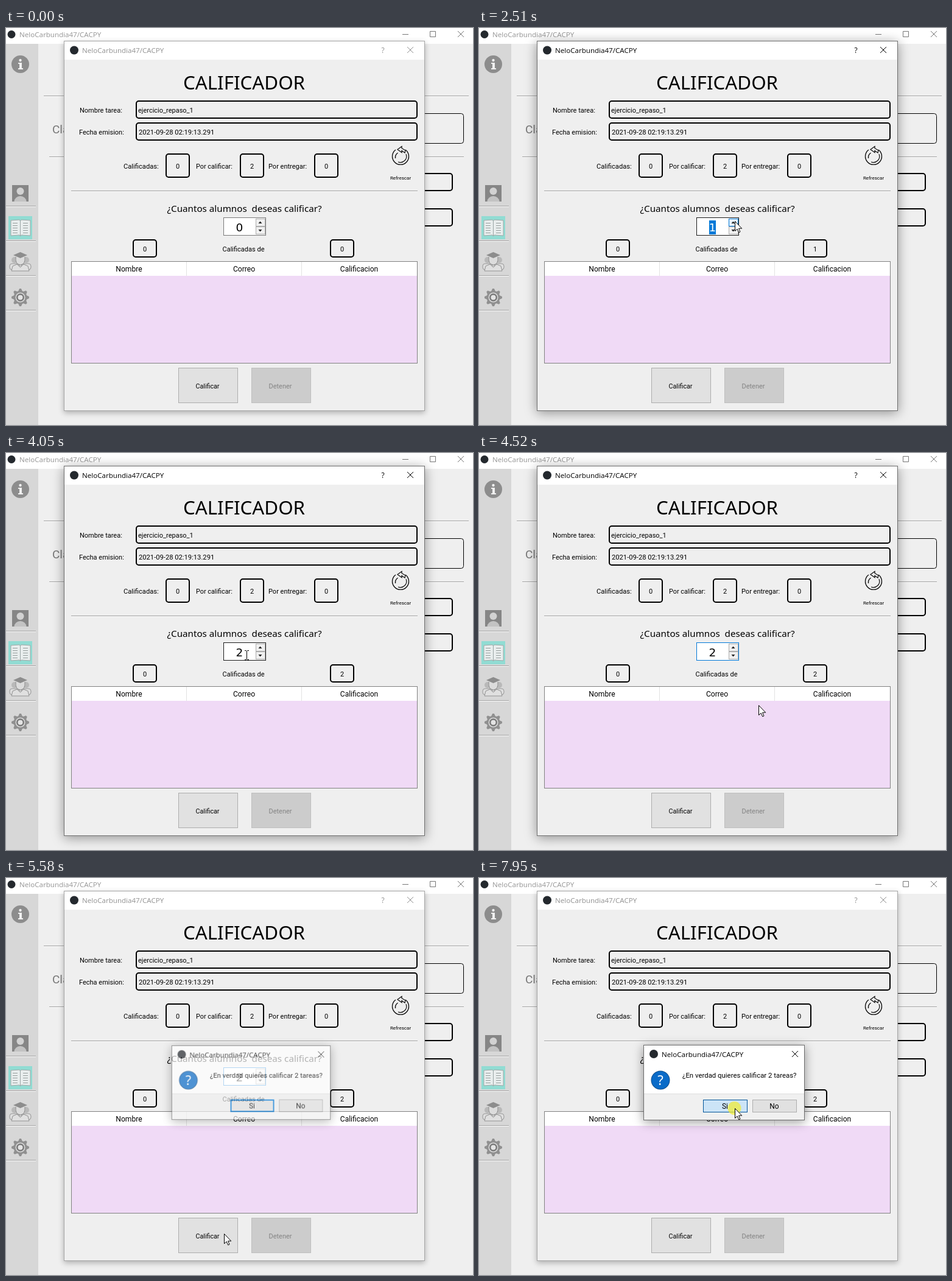
Write an HTML page with a canvas that moves like this. It is 767 px wide and 652 px high and loops after 8000 ms.

```html
<!DOCTYPE html>
<html lang="es">
<head>
<meta charset="utf-8">
<title>Calificador</title>
<style>
html, body { margin: 0; width: 767px; height: 652px; overflow: hidden; background: #efefef; }
canvas { display: block; }
</style>
</head>
<body>
<canvas id="stage" width="767" height="652"></canvas>
<script>
const ctx = document.getElementById('stage').getContext('2d');
const LOOP = 8000;
const TITLE = 'NeloCarbundia47/CACPY';
const UI = 'Roboto, sans-serif', BAR = '"Open Sans", sans-serif';
const BIG = '"Noto Sans", sans-serif', DIGIT = '"DejaVu Sans", sans-serif';
const BLUE = '#0078d7', FACE = '#efefef';

// Pointer stops: time, x, y
const PATH = [
  [590, 700, 614], [730, 577, 480], [1140, 577, 480], [1500, 432, 270], [1700, 424, 296],
  [1900, 420, 317], [3310, 420, 317], [3520, 418, 365], [3740, 395, 331], [4320, 395, 331],
  [4560, 472, 430], [4850, 372, 500], [5110, 358, 584], [6060, 358, 584], [6470, 410, 403],
  [6810, 418, 382], [6880, 418, 382], [7150, 420, 378]
];
const CLICKS = [2230, 2790, 3750, 5250, 7880];

const ramp = (t, a, b) => Math.min(1, Math.max(0, (t - a) / (b - a)));
const gray = v => `rgb(${v},${v},${v})`;
const inside = (p, x, y, w, h) => p && p.x >= x && p.x < x + w && p.y >= y && p.y < y + h;

function pointerAt(t) {
  if (t < PATH[0][0]) return null;
  const i = PATH.findIndex(k => k[0] > t);
  if (i < 0) { const [, x, y] = PATH[PATH.length - 1]; return { x, y }; }
  const a = PATH[i - 1], b = PATH[i], p = ramp(t, a[0], b[0]);
  return { x: a[1] + (b[1] - a[1]) * p, y: a[2] + (b[2] - a[2]) * p };
}

function rect(x, y, w, h, color) {
  ctx.fillStyle = color;
  ctx.fillRect(x, y, w, h);
}
function framed(x, y, w, h, fill, border, line = 1) {
  rect(x, y, w, h, border);
  rect(x + line, y + line, w - 2 * line, h - 2 * line, fill);
}
function rounded(x, y, w, h, line = 2) {
  ctx.beginPath();
  ctx.roundRect(x + line / 2, y + line / 2, w - line, h - line, 4);
  ctx.strokeStyle = '#000';
  ctx.lineWidth = line;
  ctx.stroke();
}
function disc(x, y, r, color) {
  ctx.beginPath();
  ctx.arc(x, y, r, 0, 2 * Math.PI);
  ctx.fillStyle = color;
  ctx.fill();
}
function shape(points, fill, stroke, line = 1) {
  ctx.beginPath();
  points.forEach(([x, y]) => ctx.lineTo(x, y));
  ctx.closePath();
  if (fill) { ctx.fillStyle = fill; ctx.fill(); }
  if (stroke) { ctx.strokeStyle = stroke; ctx.lineWidth = line; ctx.stroke(); }
}
function stroke(d, color, line = 1) {
  ctx.strokeStyle = color;
  ctx.lineWidth = line;
  ctx.stroke(new Path2D(d));
}
function text(s, x, y, size = 11, family = UI, color = '#000', align = 'left') {
  ctx.font = `${size}px ${family}`;
  ctx.textAlign = align;
  ctx.fillStyle = color;
  ctx.fillText(s, x, y);
}
const centered = (s, x, y, size, family, color) => text(s, x, y, size, family, color, 'center');
function groove(x, y, w) {
  rect(x, y, w, 1, '#a0a0a0');
  rect(x, y + 1, w, 1, '#fff');
}
function closeMark(x, y, color) {
  stroke(`M${x} ${y}l10 10m0-10l-10 10`, color);
}
function counter(value, x, y, h) {
  rounded(x, y, 40, h);
  centered(value, x + 20, y + h / 2 + 5);
}
function shadowed(x, y, w, h, alpha, blur) {
  ctx.save();
  ctx.shadowColor = `rgba(0,0,0,${alpha})`;
  ctx.shadowBlur = blur;
  ctx.shadowOffsetY = 3;
  rect(x, y, w, h, '#fff');
  ctx.restore();
}

function sidebar() {
  rect(0, 26, 53, 626, '#d7d7d7');
  disc(23.5, 59.5, 14.5, '#8d8d8d');
  disc(23.5, 53, 2.2, '#f0f0f0');
  rect(22, 57, 4, 11, '#f0f0f0');
  rect(20, 57, 3, 2, '#f0f0f0');
  rect(20, 66, 8, 2, '#f0f0f0');
  [292, 349, 406, 463].forEach(y => groove(0, y, 49));

  rect(10, 258, 27, 27, '#868686');
  ctx.save();
  ctx.beginPath();
  ctx.rect(10, 258, 27, 27);
  ctx.clip();
  ctx.beginPath();
  ctx.ellipse(23.5, 285, 10, 9, 0, 0, 2 * Math.PI);
  ctx.fillStyle = '#c3c3c3';
  ctx.fill();
  disc(23.5, 268, 6, '#d2d2d2');
  ctx.restore();

  rect(4, 309, 39, 38, '#91dcd3');
  shape([[8, 316], [22, 315], [23.5, 317], [25, 315], [40, 316], [40, 341], [25, 340], [23.5, 342], [22, 340], [8, 341]], '#e9eeee', '#a0a8a7');
  stroke('M23.5 317v24', '#9aa5a4');
  for (let y = 320.5; y < 338; y += 4) stroke(`M11 ${y}h8m9 0h8`, '#969e9d');

  for (const x of [14, 33]) {
    disc(x, 381, 5, '#b9b9b9');
    ctx.beginPath();
    ctx.roundRect(x - 8, 387, 16, 10, 4);
    ctx.fillStyle = '#dedede';
    ctx.fill();
    ctx.strokeStyle = '#999';
    ctx.stroke();
  }
  disc(23.5, 380, 8, '#dcdcdc');
  stroke('M16 376q-1 13 7.500 13q8.500 0 7.500-13', '#888');
  shape([[12, 373], [23.5, 368], [35, 373], [23.5, 378]], '#8d8d8d');
  shape([[9, 399], [11, 391], [18, 388], [23.5, 393], [29, 388], [36, 391], [38, 399]], '#e0e0e0', '#929292');

  const teeth = [];
  for (let i = 0; i < 32; i++) {
    const a = (i - 0.5) * Math.PI / 16, r = i % 4 < 2 ? 14.5 : 11;
    teeth.push([23.5 + r * Math.cos(a), 442.5 + r * Math.sin(a)]);
  }
  shape(teeth, '#909090');
  disc(23.5, 442.5, 8, '#d9d9d9');
  disc(23.5, 442.5, 6.5, '#777');
  disc(23.5, 442.5, 4, '#e4e4e4');
}

function mainWindow() {
  rect(0, 0, 767, 652, FACE);
  rect(0, 0, 767, 26, '#fff');
  disc(9, 10.500, 6.500, '#24292e');
  text(TITLE, 22, 15, 11.6, BAR, '#959595');
  rect(651, 10, 10, 1, '#777');
  stroke('M696.5 5.5h9v9h-9z', '#777');
  closeMark(742, 5, '#777');
  sidebar();
  groove(62, 111, 698);
  text('Clase', 76, 173, 19, UI, '#777');
  rounded(600, 140, 152, 50, 1);
  groove(71, 211, 681);
  rounded(600, 238, 134, 30);
  rounded(600, 296, 134, 30);
}

function refreshIcon() {
  stroke('M640 200a13.500 13.500 0 1 0 16 0M643.500 205a9.500 9.500 0 0 0-4 9', '#111', 1.4);
  stroke('M657 207a10 10 0 0 1-13 13', '#111', 1.2);
  shape([[643, 199.500], [650, 194.500], [650, 197.500], [656, 201], [655, 205], [650, 201.500], [650, 204.500]], FACE, '#111', 1.3);
  centered('Refrescar', 648, 248.500, 8);
}

function spinner(t, p, count) {
  const hover = inside(p, 357, 311, 70, 30);
  const border = hover ? '#1c1c1c' : t > 2230 ? BLUE : '#7a7a7a';
  framed(357, 311, 70, 30, '#fff', border);
  const selected = count > 0 && t < 3800;
  if (selected) rect(378, 316, 11, 23, BLUE);
  centered(count, 383.500, 334, 18.5, DIGIT, selected ? '#fff' : '#000');
  const up = inside(p, 410, 311, 17, 15), down = inside(p, 410, 326, 17, 15);
  framed(410, 313, 16, 13, up ? '#e5f1fb' : '#f0f0f0', up ? BLUE : '#adadad');
  framed(410, 326, 16, 13, down ? '#e5f1fb' : '#f0f0f0', down ? BLUE : '#adadad');
  shape([[414.5, 321], [417.5, 317.5], [420.5, 321]], '#222');
  shape([[414.5, 331], [417.5, 334.500], [420.5, 331]], '#222');
}

function table() {
  framed(107, 383, 569, 168, '#f0daf6', '#828282');
  rect(108, 384, 567, 23, '#fff');
  rect(296, 384, 1, 23, '#e2e2e2');
  rect(485, 384, 1, 23, '#e2e2e2');
  centered('Nombre', 202, 400, 12.1);
  centered('Correo', 391, 400, 12.1);
  centered('Calificacion', 580, 400, 12);
}

function dialog(t, p) {
  const active = ramp(t, 2230, 2450) * (1 - ramp(t, 5330, 5530));
  const ink = gray(Math.round(145 * (1 - active)));
  const count = t < 2250 ? 0 : t < 2800 ? 1 : 2;

  shadowed(95, 21, 593, 608, 0.28 + 0.12 * active, 9 + 9 * active);
  framed(95, 21, 593, 608, FACE, gray(Math.round(165 - 55 * active)));
  rect(96, 22, 591, 30, '#fff');
  disc(112, 36.500, 7, '#24292e');
  text(TITLE, 125, 41, 11.6, BAR, ink);
  centered('?', 619, 41, 12, BAR, ink);
  closeMark(659, 31, ink);

  centered('CALIFICADOR', 391, 101, 31.3, BIG);
  text('Nombre tarea:', 121, 139);
  text('Fecha emision:', 120, 175);
  rounded(213, 119, 463, 30);
  rounded(213, 155, 463, 30);
  text('ejercicio_repaso_1', 217, 139);
  text('2021-09-28 02:19:13.291', 218, 175, 11.2);
  text('Calificadas:', 193, 231, 11.2);
  text('Por calificar:', 312, 231, 10.8);
  text('Por entregar:', 431, 231);
  counter('0', 262, 206, 40);
  counter('2', 384, 206, 40);
  counter('0', 506, 206, 40);
  refreshIcon();
  groove(107, 267, 569);

  centered('¿Cuantos alumnos  deseas calificar?', 391.5, 302, 15.2, BIG);
  spinner(t, p, count);
  counter('0', 208, 347, 30);
  counter(count, 532, 347, 30);
  centered('Calificadas de', 390, 367);
  table();

  const hover = t < 5480 && inside(p, 283, 558, 98, 58);
  const pressed = hover && t >= 5250 && t < 5400;
  framed(283, 558, 98, 58, pressed ? '#cce4f7' : hover ? '#e5f1fb' : '#e1e1e1', hover ? BLUE : '#adadad');
  centered('Calificar', 331, 592, 10.7);
  framed(403, 558, 98, 58, '#ccc', '#bfbfbf');
  centered('Detener', 450.5, 592, 11, UI, '#838383');
}

function question(t, p) {
  const k = ramp(t, 5500, 5680), open = 1 - (1 - k) ** 2;
  if (!open) return;
  const layer = new OffscreenCanvas(767, 652), page = ctx.canvas;
  const g = layer.getContext('2d');
  // Compose the box apart so that it fades as one piece
  drawOn(g, () => {
    shadowed(270, 274, 265, 124, 0.4, 16);
    framed(270, 274, 265, 124, '#fff', '#6c6c6c');
    rect(271, 354, 263, 43, '#f0f0f0');
    rect(271, 354, 263, 1, '#dfdfdf');
    disc(287, 289, 7, '#24292e');
    text(TITLE, 300, 294, 11.6, BAR);
    closeMark(514, 284, '#000');
    disc(298, 332, 15.5, '#124f8c');
    disc(298, 332, 14.500, '#0a6bc8');
    centered('?', 298, 340, 22, BIG, '#fff');
    text('¿En verdad quieres calificar 2 tareas?', 334, 328, 11.4);
    const hover = ramp(t, 6650, 6850) > 0 && inside(p, 368, 364, 73, 22);
    const pressed = t >= 7880;
    framed(368, 364, 73, 21, pressed ? '#cce4f7' : hover ? '#e5f1fb' : '#e1e1e1',
      pressed ? '#005499' : BLUE, hover ? 1 : 2);
    centered('Si', 404, 379, 12);
    framed(449, 364, 73, 21, '#e1e1e1', '#adadad');
    centered('No', 485, 379, 12);
  });
  const s = 0.955 + 0.045 * open;
  ctx.save();
  ctx.globalAlpha = open;
  ctx.translate(402.5, 336);
  ctx.scale(s, s);
  ctx.drawImage(layer, -402.5, -336);
  ctx.restore();
}

function pointer(t, p) {
  if (!p) return;
  for (const c of CLICKS) {
    const a = 0.72 * ramp(t, c - 40, c + 20) * (1 - ramp(t, c + 180, c + 280));
    if (t >= c && a > 0) disc(p.x - 0.5, p.y, 11, `rgba(240,236,50,${a})`);
  }
  const x = Math.round(p.x), y = Math.round(p.y);
  if (inside(p, 358, 312, 51, 28)) {
    stroke(`M${x - 3} ${y - 6.500}h2.500l1 1l1-1h2.500M${x + 0.5} ${y - 6}v14M${x - 3} ${y + 8.500}h2.500l1-1l1 1h2.500`, '#000');
    return;
  }
  const arrow = [[0, 0], [0, 16], [3.7, 12.6], [6.2, 18.300], [8.500, 17.300], [6.1, 11.700], [11.2, 11.700]];
  shape(arrow.map(([dx, dy]) => [x + 0.5 + dx, y + 0.5 + dy]), '#fff', '#000');
}

// Redirects the drawing helpers to another context for one call
function drawOn(g, draw) {
  const names = ['fillRect', 'beginPath', 'roundRect', 'stroke', 'arc', 'fill', 'fillText', 'save', 'restore'];
  const props = ['fillStyle', 'strokeStyle', 'lineWidth', 'font', 'textAlign', 'shadowColor', 'shadowBlur', 'shadowOffsetY'];
  names.forEach(n => { ctx[n] = (...args) => g[n](...args); });
  props.forEach(n => Object.defineProperty(ctx, n, { configurable: true, get: () => g[n], set: v => { g[n] = v; } }));
  draw();
  [...names, ...props].forEach(n => { delete ctx[n]; });
}

function frame(now) {
  const t = now % LOOP, p = pointerAt(t);
  mainWindow();
  dialog(t, p);
  question(t, p);
  pointer(t, p);
  requestAnimationFrame(frame);
}
requestAnimationFrame(frame);
</script>
</body>
</html>
```
